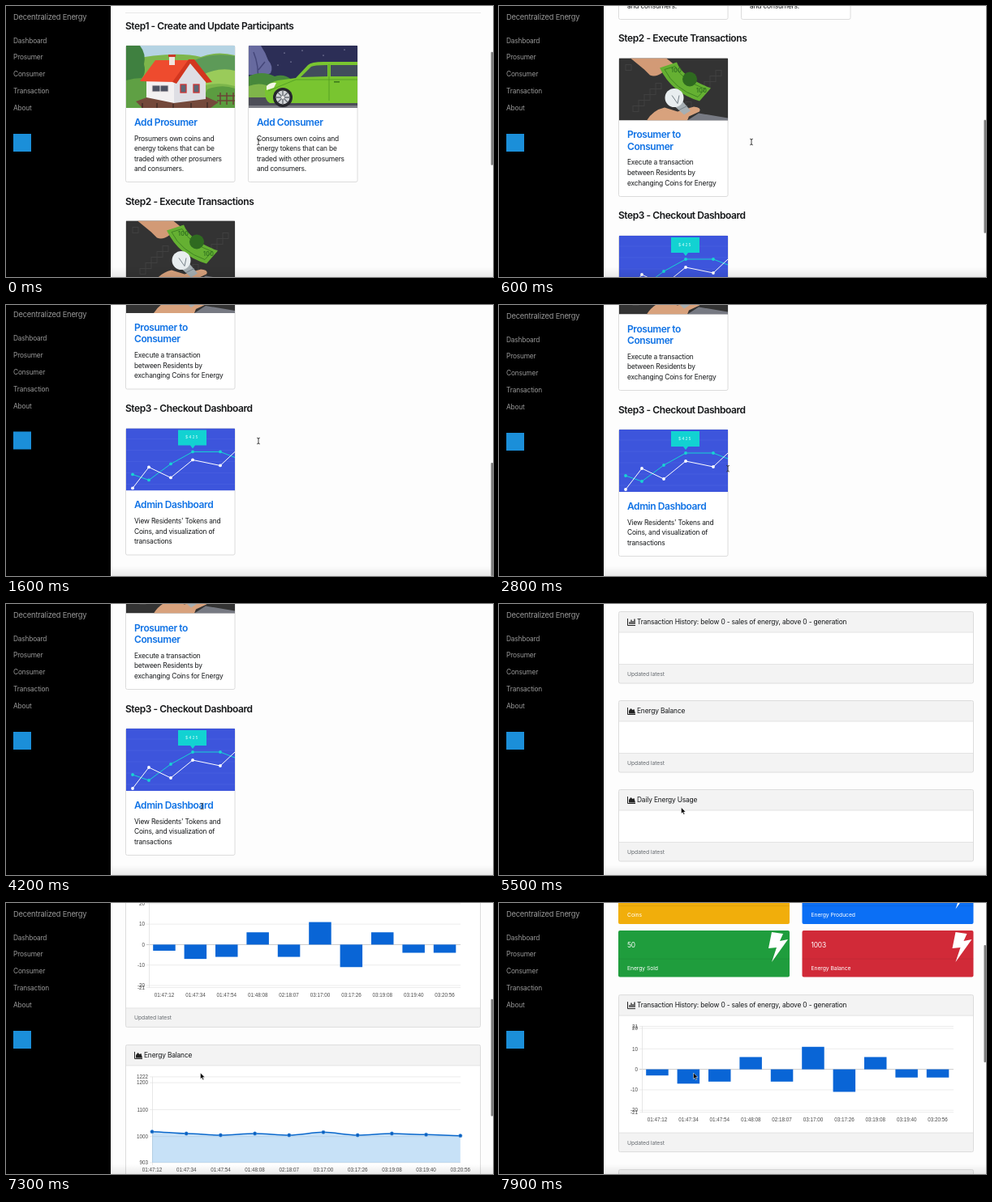
These frames come from a looping animation (600 px wide and 335 px high, 8 s). An HTML page:

```html
<!DOCTYPE html>
<html lang="en">
<head>
<meta charset="utf-8">
<title>Decentralized Energy</title>
<style>
html, body { margin: 0; width: 100%; height: 100%; overflow: hidden; background: #fdfdfd; }
svg { display: block; width: 600px; height: 335px; }
text { font-family: Inter, Roboto, sans-serif; font-size: 8.4px; letter-spacing: -.17px; fill: #141618; white-space: pre; }
.brand { font-size: 9.3px; letter-spacing: -.19px; fill: #999; }
.nav { font-size: 8.3px; fill: #999; }
.head { font-size: 12px; font-weight: 600; letter-spacing: -.43px; }
.link { fill: #0f72e5; }
.small { font-size: 6.8px; letter-spacing: -.07px; fill: #666b70; }
.white { fill: #fff; }
.axis { font: 6.3px "Liberation Sans", Arial, sans-serif; letter-spacing: 0; fill: #4c4c4c; }
.mid { text-anchor: middle; }
.end { text-anchor: end; }
.tip { font-size: 5px; letter-spacing: 1px; fill: #d8fffa; }
.note { font-size: 7px; font-weight: 600; letter-spacing: .3px; fill: #2f6f20; }
</style>
</head>
<body>
<svg id="stage" viewBox="0 0 600 335"></svg>
<script>
const text = (x, y, s, cls = '') => `<text x="${x}" y="${y}" class="${cls}">${s}</text>`;
const rect = (x, y, w, h, fill, more = '') => `<rect x="${x}" y="${y}" width="${w}" height="${h}" fill="${fill}" ${more}/>`;
const path = (d, fill, more = '') => `<path d="${d}" fill="${fill}" ${more}/>`;
const dot = (x, y, r, fill, more = '') => `<circle cx="${x}" cy="${y}" r="${r}" fill="${fill}" ${more}/>`;
const line = (d, color, width = 1, more = '') => path(d, 'none', `stroke="${color}" stroke-width="${width}" ${more}`);
const move = (x, y, s) => `<g transform="translate(${x} ${y})">${s}</g>`;

// Card pictures, each 134 x 77
const house = () =>
  rect(0, 0, 134, 77, '#7db64b') +
  path('M0 0H134V12Q112 6 92 14Q60 6 0 18Z', '#b5d3e3') +
  path('M84 18Q108 8 134 13V36H84Z', '#5d9a58') +
  path('M0 0H17Q25 10 22 23Q26 38 14 44H0Z', '#3f8040') +
  path('M0 43Q24 36 48 46V77H0Z', '#5fa044') +
  path('M94 36Q116 26 134 31V50Q114 44 94 50Z', '#9acb5a') +
  path('M100 54Q118 47 134 53V77H90Z', '#5b9c40') +
  line('M112 62H134M112 68H134M116 58V73M124 58V73M132 58V73', '#6b4636', 1.6) +
  path('M12 69L28 63H98L114 70L104 77H20Z', '#74493b') +
  path('M25 40L59 43V71L25 64Z', '#f3f1f2') +
  path('M59 43L78 20L98 43V66L59 71Z', '#dedee4') +
  path('M17 44L36 18H80L59 45Z', '#ee4b2e') +
  path('M77 17L84 17L106 45L99 46L79 22L62 47L57 45Z', '#d2361f') +
  rect(53, 13, 7, 11, '#f1e4df') + rect(52, 11, 9, 3, '#c93a28') +
  rect(32, 49, 20, 8, '#4e5363', 'stroke="#e9e1e1"') + line('M42 49V57', '#eee') +
  [67, 83].map(x => rect(x, 48, 7, 10, '#5b6675', 'stroke="#cf3434" stroke-width="1.3"')).join('') +
  line('M20 71V77M38 71V77M58 72V77M80 71V77M100 70V77', '#4f342c', 2);

const car = () =>
  rect(0, 0, 134, 77, '#2c2e56') +
  [[44, 9], [52, 20], [66, 6], [92, 12], [118, 5], [36, 24]].map(([x, y]) => dot(x, y, .6, '#d8daf0')).join('') +
  path('M0 0H15Q21 9 24 18Q31 26 27 34Q20 38 0 36Z', '#676a9f') +
  line('M11 44Q13 25 6 8M12 30L20 20', '#45477a', 1.5) +
  path('M0 38Q16 30 32 38Q43 34 53 42V64H0Z', '#47883b') +
  path('M0 50Q14 44 30 52V66H0Z', '#7fb54a') +
  rect(0, 64, 134, 13, '#4c4d57') + rect(0, 74, 134, 3, '#7c7d84') +
  path('M20 57Q20 47 36 43L58 40L73 24Q77 20 92 20H134V71H26Q20 68 20 57Z', '#79c530') +
  path('M64 39L77 26Q80 24 97 24V38Z', '#414d5c') +
  path('M101 24H134V38H101Z', '#414d5c') +
  line('M24 56L58 42H134M99 23V68', '#4f9a22', .8) +
  path('M22 50Q27 45 34 46L31 52L22 55Z', '#f4f6e5') +
  rect(105, 44, 7, 1.6, '#3d791c') +
  dot(42, 64, 12, '#26272d') + dot(42, 64, 8.5, '#d2d5d8') +
  line('M34 64h16M42 56v16M36 58l12 12M48 58l-12 12', '#686d74', 1.4) + dot(42, 64, 2, '#eee');

const trade = () =>
  rect(0, 0, 134, 77, '#333') +
  [...Array(14).keys()].map(i => rect(8 + i * 37 % 118, 8 + i * 23 % 62, 7, 7, 'none', 'stroke="#404040"')).join('') +
  path('M14 0H58L68 8Q66 13 58 12L53 18Q45 24 38 21L31 14Z', '#d29a76') +
  path('M50 12L71 5Q78 24 113 37L99 53Q65 43 50 12Z', '#65b032') +
  line('M56 14L69 10Q78 28 106 38L97 48Q68 38 56 14Z', '#36781f', .8) +
  dot(87, 26, 9, '#2f6a20') + text(64, 18, '100', 'note') + text(95, 43, '100', 'note') +
  path('M34 77Q42 64 56 61L72 66L92 60Q102 61 99 66L86 72L84 77Z', '#d8a27d') +
  path('M84 77L98 68L134 74V77Z', '#777a83') +
  path('M69 60L78 53L88 65L80 70Z', '#a6afb3') +
  dot(68, 49, 11.5, '#e8edef') +
  line('M65 46L72 56L74 46M74 64L84 59', '#758087', 1);

const plot = () => {
  const series = (ys, color) => {
    const pts = [8, 28, 55, 82, 116, 134].map((x, i) => [x, ys[i]]);
    return line('M' + pts.join('L'), color, 1) + pts.slice(0, 5).map(p => dot(...p, 1.9, color)).join('');
  };
  return rect(0, 0, 134, 77, '#3d55dc') +
    line('M0 13H134M0 27H134M0 41H134M0 55H134M0 69H134', '#4860e0', .8) +
    series([57, 64, 44, 29, 29, 36], '#17d4d2') +
    series([74, 48, 61, 39, 46, 29], '#fff') +
    path('M64 2H99V21H85L82 25L79 21H64Z', '#12d2d2') + text(73, 13, '$425', 'tip');
};

function tile(x, y, h, picture, titles, lines) {
  return rect(x, y, 134.5, h, '#fff', 'rx="2" stroke="#dcdcdc"') +
    move(x + .5, y, `<g clip-path="url(#pic)">${picture}</g>`) +
    titles.map((s, i) => text(x + 10.5, y + 99 + i * 14.5, s, 'head link')).join('') +
    lines.map((s, i) => text(x + 10.5, y + 103 + titles.length * 14.5 + i * 12.6, s)).join('');
}

const owns = who => [`${who} own coins and`, 'energy tokens that can be', 'traded with other prosumers', 'and consumers.'];
const home = () =>
  line('M147 144.5H585', '#e8e8e8') +
  text(147, 165, 'Step1 - Create and Update Participants', 'head') +
  tile(147.5, 185, 168.5, house(), ['Add Prosumer'], owns('Prosumers')) +
  tile(298.5, 185, 168.5, car(), ['Add Consumer'], owns('Consumers')) +
  text(147, 381.5, 'Step2 - Execute Transactions', 'head') +
  tile(147.5, 401.5, 171, trade(), ['Prosumer to', 'Consumer'],
    ['Execute a transaction', 'between Residents by', 'exchanging Coins for Energy']) +
  text(147, 600.5, 'Step3 - Checkout Dashboard', 'head') +
  tile(147.5, 621, 156.5, plot(), ['Admin Dashboard'],
    ["View Residents' Tokens and", 'Coins, and visualization of', 'transactions']);

// Dashboard
const times = '01:47:12 01:47:34 01:47:54 01:48:08 02:18:07 03:17:00 03:17:26 03:19:08 03:19:40 03:20:56'.split(' ');
const labels = (x0, step, y) => times.map((s, i) => text(x0 + i * step, y, s, 'axis mid')).join('');
const grid = (ticks, yOf, x, right) => ticks.map(v =>
  line(`M${x} ${yOf(v)}H560`, v ? '#e4e4e4' : '#b5b5b5', .7) + text(right, yOf(v) + 2.2, v, 'axis end')).join('');

function bars() {
  const y = v => 92.5 - v * 2.53;
  return grid([21, 20, 10, 0, -10, -20, -21], y, 173, 171) +
    line('M176.5 39V146', '#ddd', .7) +
    [-3, -7, -6, 6, -6, 11, -11, 6, -4, -4].map((v, i) =>
      rect(181.2 + i * 38.4, Math.min(y(v), y(0)), 27.5, Math.abs(v) * 2.53, '#0965d6')).join('') +
    labels(195, 38.4, 157);
}

function balance() {
  const y = v => 146 - (v - 903) * .3325;
  const pts = [1018, 1011, 1005, 1011, 1005, 1016, 1005, 1011, 1007, 1003].map((v, i) => [180 + i * 42.2, y(v)]);
  const curve = 'M' + pts[0] + pts.slice(1).map(([x, py], i) => `C${pts[i][0] + 13} ${pts[i][1]} ${x - 13} ${py} ${x} ${py}`).join('');
  return grid([1222, 1200, 1100, 1000, 903], y, 177, 175) +
    line('M180.5 40V149', '#ddd', .7) +
    path(curve + 'V146H180Z', '#0275d8', 'fill-opacity=".22"') +
    line(curve, '#0a68cc', 1.5) +
    pts.map(p => dot(...p, 2.2, '#0a60c0', 'stroke="#5d9fe0" stroke-width=".5"')).join('') +
    labels(180, 42.2, 157);
}

const barIcon = line('M158.5 9V17.5H168', '#222') + line('M161 16V13M163 16V10.5M165 16V12M167 16V9.5', '#222', 1.3);
const areaIcon = line('M158.5 9V17.5H168', '#222') + path('M160 16.5V13L162.5 10L164.5 12L166.5 11L168 16.5Z', '#222');

function panel(y, title, icon, chart = '') {
  const foot = chart ? 171 : 65.5, h = foot + 23.5;
  return move(0, y, rect(147.5, .5, 437, h - .5, '#fff', 'rx="2"') +
    rect(147.5, .5, 437, 25.5, '#f3f3f3') + rect(147.5, foot, 437, 23.5, '#f3f3f3') +
    line(`M147.5 26H584.5M147.5 ${foot}H584.5`, '#dedede', .8) +
    rect(147.5, .5, 437, h - .5, 'none', 'rx="2" stroke="#dcdcdc"') +
    icon + text(170, 16, title) + text(158, foot + 14.5, 'Updated latest', 'small') + chart);
}

const bolt = path('M189 2L203 4L199 13L209 11L189 39L195 21L185 22Z', '#fff');
const bill = path('M181 2L207 -4L213 25L187 31Z', '#fff');
const stat = (x, y, color, num, label, icon) => move(x, y,
  rect(0, 0, 211, 57.5, color, 'rx="2"') + `<g clip-path="url(#stat)">${icon}</g>` +
  line('M0 35H211', 'rgba(0,0,0,.09)', .8) +
  text(11, 20.5, num, 'white') + text(11, 48.5, label, 'small white'));

const dash = full =>
  stat(147, 88.5, '#f1ae0b', '', 'Coins', bill) +
  stat(373.5, 88.5, '#0b6ff5', '', 'Energy Produced', bolt) +
  stat(147, 154, '#1f9d3d', '50', 'Energy Sold', bolt) +
  stat(373.5, 154, '#d12a38', '1003', 'Energy Balance', bolt) +
  panel(233, 'Transaction History: below 0 - sales of energy, above 0 - generation', barIcon, full && bars()) +
  panel(full ? 449 : 343, 'Energy Balance', areaIcon, full && balance()) +
  panel(full ? 665 : 453, 'Daily Energy Usage', areaIcon);

const nav = ['Dashboard', 'Prosumer', 'Consumer', 'Transaction', 'About'];
const $ = id => document.getElementById(id);

$('stage').innerHTML = `
  <defs>
    <clipPath id="pic"><rect width="134" height="77"/></clipPath>
    <clipPath id="stat"><rect width="211" height="57.5"/></clipPath>
    <linearGradient id="fade" x2="0" y2="1"><stop stop-opacity="0"/><stop offset="1" stop-opacity=".08"/></linearGradient>
  </defs>
  ${rect(0, 0, 600, 335, '#fdfdfd')}
  <g id="home">${home()}</g><g id="empty">${dash(false)}</g><g id="full">${dash(true)}</g>
  ${rect(0, 0, 129, 335, '#000')}
  <g id="side">${text(9, 16.5, 'Decentralized Energy', 'brand')}
    ${nav.map((s, i) => text(9, 45.5 + i * 20.9, s, 'nav')).join('')}
    ${rect(9, 158, 22, 22, '#1b8fd9')}</g>
  ${rect(129, 323, 471, 12, 'url(#fade)')}
  ${rect(597.5, 0, 2.5, 140, '#7c7c7c', 'id="thumb" rx="1"')}
  <g id="beam">${line('M-1.8 -3.8Q0 -3.8 0 -2.5Q0 -3.8 1.8 -3.8M0 -3V3M-1.8 3.8Q0 3.8 0 2.5Q0 3.8 1.8 3.8', '#333', .9)}</g>
  <g id="arrow">${path('M0 0V7.6L1.8 6L3 8.8L4.3 8.2L3.1 5.5H5.5Z', '#000', 'stroke="#fff" stroke-width=".5"')}</g>`;

// Eased value from [time, value] keys
function at(t, ...keys) {
  const i = keys.findIndex(k => k[0] > t);
  if (i < 0) return keys[keys.length - 1][1];
  if (!i) return keys[0][1];
  const [t0, a] = keys[i - 1], [t1, b] = keys[i], p = (t - t0) / (t1 - t0);
  return a + (b - a) * p * p * (3 - 2 * p);
}

// A flick that slows down until the page end, and a steady drag back up
const flick = t => Math.min(467, 136 + 452 * (1 - Math.exp(-t / 1020)));
const dragUp = t => 436 - Math.max(0, t - 6670) * .257;

const place = (id, x, y) => $(id).setAttribute('transform', `translate(${x} ${y})`);
const show = (id, on) => $(id).setAttribute('opacity', +on);

function draw(t) {
  const onHome = t < 5000, loaded = t >= 6500;
  const bounce = at(t, [1350, 0], [1550, 1.6], [1950, 0]);
  const scroll = onHome ? flick(t) : loaded ? dragUp(t) : 224;
  const height = onHome ? 802 : 774;

  show('home', onHome);
  show('empty', !onHome && !loaded);
  show('full', loaded);
  for (const id of ['home', 'empty', 'full']) place(id, 0, -scroll - bounce);
  place('side', 0, -bounce);

  $('thumb').setAttribute('y', scroll / height * 335);
  $('thumb').setAttribute('height', 335 * 335 / height);
  show('thumb', loaded ? 1 : at(t, [2200, 1], [2500, 0]));

  const x = at(t, [2400, 311], [3300, 241.5], [5000, 241.5], [5400, 224.5], [5600, 224.5], [6300, 239.5]);
  const y = at(t, [2400, 168], [3300, 250], [5000, 250], [5400, 251.5], [5600, 251.5], [6300, 210]);
  place('beam', x, y);
  place('arrow', x, y);
  show('beam', onHome);
  show('arrow', !onHome);
}

const start = performance.now();
function tick() {
  draw(Math.floor((performance.now() - start) % 8000 / 100) * 100);
  requestAnimationFrame(tick);
}
tick();
</script>
</body>
</html>
```
